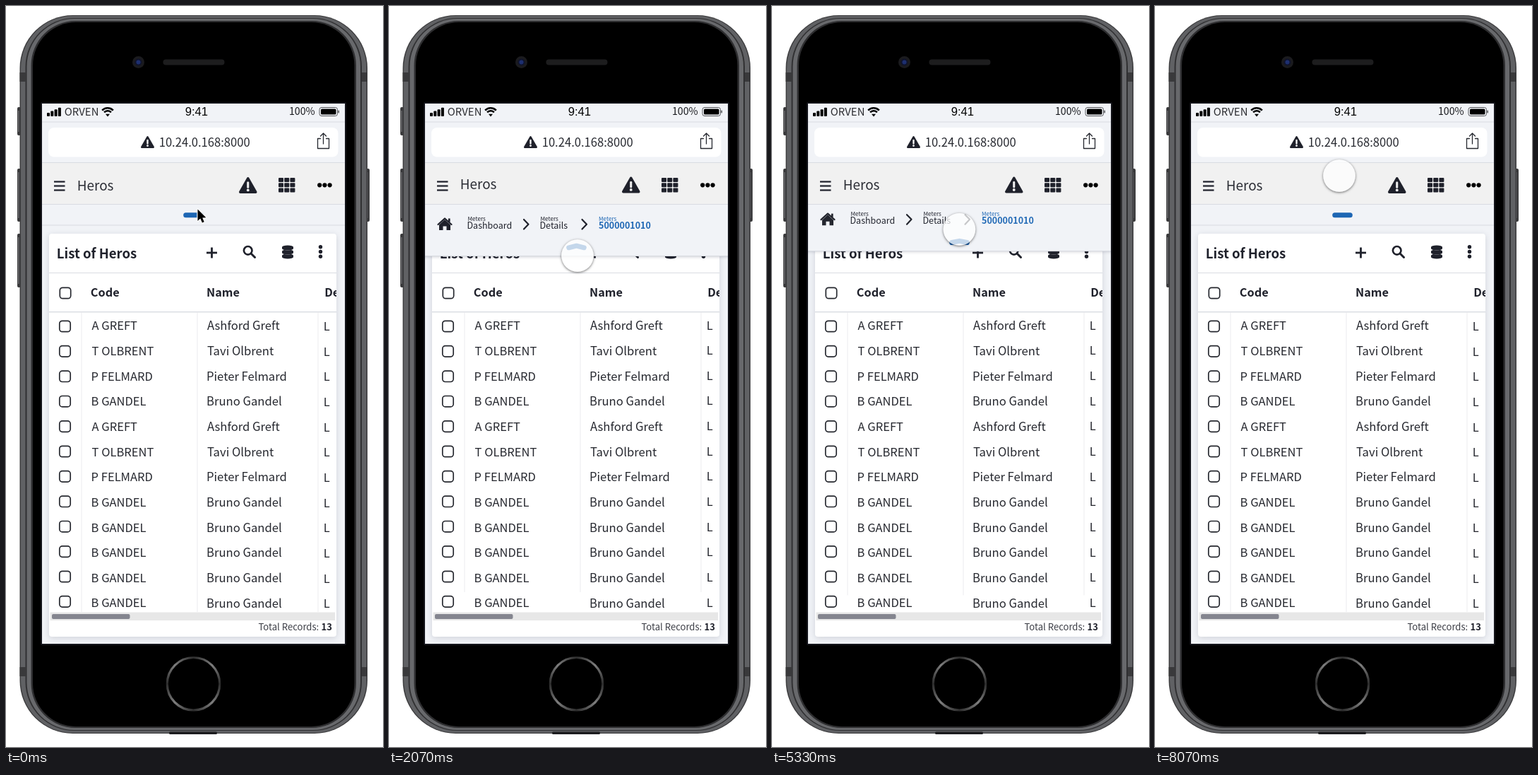
An HTML page with a canvas for the animation above (8.59 s loop, 534 by 1048 pixels).

```html
<!DOCTYPE html>
<html lang="en">
<head>
<meta charset="utf-8">
<title>Pull-down breadcrumbs</title>
<style>
html, body { margin: 0; width: 100%; height: 100%; overflow: hidden; background: #fff; }
canvas { display: block; width: 100vw; height: 100vh; }
</style>
</head>
<body>
<canvas id="stage" width="534" height="1048"></canvas>
<script>
const ctx = document.getElementById('stage').getContext('2d');
const LOOP = 8590;
const SANS = '"Noto Sans CJK SC", "Noto Sans CJK JP", "Noto Sans CJK", "Open Sans", sans-serif';
const INK = '#1f212b', SOFT = '#26282f', BLUE = '#1d66b4', PALE = '#f1f3f7', RULE = '#d9dce2';
const PEOPLE = ['Ashford Greft', 'Tavi Olbrent', 'Pieter Felmard', 'Bruno Gandel'];

// finger moves: from, to, dx, dy
const MOVES = [
  [530, 1070, -5, 5],
  [1470, 2070, 1, 58],
  [2070, 3130, -2, 52],
  [4000, 4470, 2, -61],
  [5060, 6060, -6, -104]
];

const lerp = (a, b, k) => a + (b - a) * k;
const span = (t, from, to) => Math.min(1, Math.max(0, (t - from) / (to - from)));
const ease = k => k < .5 ? 2 * k * k : 1 - 2 * (1 - k) * (1 - k);

function rect(x, y, w, h, color) {
  ctx.fillStyle = color;
  ctx.fillRect(x, y, w, h);
}
function round(x, y, w, h, r, color) {
  ctx.beginPath();
  ctx.roundRect(x, y, w, h, r);
  ctx.fillStyle = color;
  ctx.fill();
}
function stroke(color, lw) {
  ctx.strokeStyle = color;
  ctx.lineWidth = lw;
  ctx.stroke();
}
function outline(x, y, w, h, r, color, lw) {
  ctx.beginPath();
  ctx.roundRect(x, y, w, h, r);
  stroke(color, lw);
}
function disc(x, y, r, color) {
  ctx.beginPath();
  ctx.arc(x, y, r, 0, 7);
  ctx.fillStyle = color;
  ctx.fill();
}
function trace(pts) {
  ctx.beginPath();
  pts.forEach(([x, y]) => ctx.lineTo(x, y));
}
function line(pts, color, lw, cap = 'butt') {
  trace(pts);
  ctx.lineCap = cap;
  ctx.lineJoin = cap === 'round' ? 'round' : 'miter';
  stroke(color, lw);
}
function poly(pts, color) {
  trace(pts);
  ctx.closePath();
  ctx.fillStyle = color;
  ctx.fill();
}
function shadow(color, blur, dy) {
  ctx.shadowColor = color;
  ctx.shadowBlur = blur;
  ctx.shadowOffsetY = dy;
}
// x is the left edge of the ink, cy the middle of the capitals
function text(s, x, cy, size, color = INK, weight = 400, family = SANS) {
  ctx.font = `${weight} ${size}px ${family}`;
  ctx.fillStyle = color;
  ctx.fillText(s, x + ctx.measureText(s).actualBoundingBoxLeft, cy + size * .365);
}
function clipped(x, y, w, h, draw) {
  ctx.save();
  ctx.beginPath();
  ctx.rect(x, y, w, h);
  ctx.clip();
  draw();
  ctx.restore();
}

function phone() {
  for (const [x, y, h] of [[16, 143, 40], [16, 230, 75], [16, 322, 76], [510, 230, 75]]) {
    round(x, y, 5, h, 2, '#3a3a3c');
    rect(x + 1, y + 5, 1.5, h - 10, '#6b6b6e');
  }
  const shell = (dx, dy, color) =>
    round(19.5 + dx, 13 + dy, 492.5 - 2 * dx, 1016 - 2 * dy, 75 - dx * .75, color);
  shell(0, 0, '#3c3c3e');
  shell(1.5, 1, '#606164');
  for (const x of [19.5, 504]) for (const y of [94, 935]) rect(x, y, 8, 13, '#39393b');
  shell(8, 4, '#303032');
  shell(10, 5, '#68696c');
  shell(16, 8, '#2e2e30');
  shell(18.5, 10, '#000');
  round(231, 1026.5, 68, 3.5, 1.5, '#1d1d1f');

  disc(187.5, 79.5, 8.5, '#1b1b1e');
  disc(187.5, 79.5, 5, '#10142c');
  disc(187.5, 79.5, 3, '#1d2f70');
  round(222.5, 75.5, 87, 8, 4, '#1d1d1e');

  const ring = ctx.createConicGradient(0, 265.5, 958.7);
  for (let i = 0; i <= 8; i++) ring.addColorStop(i / 8, i % 2 ? '#7d7d7d' : '#2c2c2c');
  ctx.beginPath();
  ctx.arc(265.5, 958.7, 37.2, 0, 7);
  stroke(ring, 3.2);
  outline(50, 137, 431, 766, 1, '#14151b', 2);
}

function warning(x, y, w, h, hole) {
  const m = x + w / 2, r = w * .07;
  poly([[m, y + r], [x + w - r, y + h - r], [x + r, y + h - r]], INK);
  ctx.lineJoin = 'round';
  stroke(INK, r * 2);
  line([[m, y + h * .34], [m, y + h * .62]], hole, w * .12, 'round');
  disc(m, y + h * .8, w * .075, hole);
}

function browser() {
  rect(51, 138, 429, 764, PALE);
  for (let i = 0; i < 4; i++) {
    const h = 5 + i * 2.4;
    round(58 + i * 5.3, 156 - h, 4, h, 1, '#000');
  }
  text('ORVEN', 82.7, 149.5, 14.9, '#2b2c30');
  ctx.lineCap = 'butt';
  for (const r of [6.7, 10.7]) {
    ctx.beginPath();
    ctx.arc(144, 155, r, -Math.PI * .76, -Math.PI * .24);
    stroke('#000', 2.6);
  }
  poly([[144, 156.5], [141, 152.8], [147, 152.8]], '#000');
  text('9:41', 253.7, 148.5, 16.6, '#000', 400, '"Liberation Sans", sans-serif');
  text('100%', 402, 149, 14.2, '#17181c');
  outline(444, 143.5, 25.5, 12, 3, '#55565a', 1);
  round(446, 145.5, 21.5, 8, 1.5, '#000');
  round(470.5, 147.5, 1.5, 4, 1, '#55565a');
  rect(51, 163.5, 429, 1, RULE);

  round(60, 172, 410.5, 41.5, 8, '#fff');
  warning(191, 184, 19, 17, '#fff');
  text('10.24.0.168:8000', 217.7, 192.5, 16.6, SOFT);
  line([[445.5, 187.5], [441.5, 187.5], [441.5, 201.5], [457.5, 201.5], [457.5, 187.5], [453.5, 187.5]], SOFT, 1.3, 'round');
  line([[449.5, 195.5], [449.5, 180.5]], SOFT, 1.3);
  line([[445.5, 184], [449.5, 180], [453.5, 184]], SOFT, 1.3, 'round');
}

function header(p) {
  rect(51, 221.5, 429, 59, '#f1f1f1');
  rect(51, 221, 429, 1, RULE);
  rect(51, 280, 429, 1, RULE);
  for (let i = 0; i < 3; i++) {
    rect(68, 247.4 + i * 6, 15.5, 2.2, INK);
    disc(444.2 + i * 7.2, 253.3, 3.1, '#000');
  }
  text('Heros', 101.8, 254.5 - 2 * p, 18.9, '#2a2c34');
  warning(330, 242 - p * .5, 25.5, 23, '#f1f1f1');
  for (let i = 0; i < 9; i++) round(386 + i % 3 * 8.2, 243 + (i / 3 | 0) * 7.2, 7, 6, 1, INK);
}

function checkbox(x, y) {
  outline(x - 7.7, y - 7.7, 15.4, 15.4, 4, SOFT, 1.7);
}

function tools() {
  line([[284, 349], [299, 349]], INK, 2.8);
  line([[291.5, 341.5], [291.5, 356.5]], INK, 2.8);
  ctx.beginPath();
  ctx.arc(342.7, 345.8, 5.8, 0, 7);
  stroke(INK, 2.7);
  line([[347, 350], [352.5, 355.5]], INK, 3, 'round');
  // stack of three disks, each cut out of the one below
  for (let y = 353; y >= 341; y -= 6) {
    for (const [dy, color] of [[-1.6, '#fff'], [0, INK]]) {
      ctx.beginPath();
      ctx.ellipse(399, y + 2, 8, 2.6, 0, 0, Math.PI);
      ctx.ellipse(399, y + dy, 8, 2.6, 0, Math.PI, 0);
      ctx.fillStyle = color;
      if (dy === 0 || y < 353) ctx.fill();
    }
  }
  for (let i = 0; i < 3; i++) disc(445.5, 340.8 + i * 6.7, 2.7, INK);
}

function row(i, p) {
  const name = PEOPLE[i < 7 ? i % 4 : 3];
  const code = (name[0] + ' ' + name.split(' ')[1]).toUpperCase();
  const y = 452.3 + 35.65 * i;
  checkbox(83.5, 453 + 35.4 * i);
  text(code, 121.6, y, 16.55, SOFT);
  text(name, 285, y, 16.65, SOFT);
  text('L', 450.8, y + .7 - 1.5 * p, 16.5, SOFT);
}

function card(p) {
  ctx.save();
  shadow('rgba(40,45,70,.16)', 8, 2);
  round(61, 322, 407, 570, 4, '#fff');
  ctx.restore();
  text('List of Heros', 72.8, 349.8, 18.6, INK, 700);
  tools();
  rect(61, 377, 407, 1, RULE);
  rect(61, 432, 407, 1.4, RULE);
  clipped(61, 378, 407, 514, () => {
    checkbox(84, 406);
    text('Code', 119.8, 405.5, 16.3, INK, 700);
    text('Name', 285, 405, 16.3, INK, 700);
    text('De', 452.2, 405, 16.3, INK, 700);
    for (const x of [106.5, 270.5, 441.5]) rect(x, 433, 1, lerp(424, 396, p), '#ebecef');
    for (let i = 0; i < 12; i++) row(i, p);
  });
  rect(62.5, 857.5, 403.5, 11.5, '#e7e7e7');
  round(65, 860, 110.5, 7, 2, '#84858f');
  text('Total Records:', 357.5, 878.5, 13.1, '#3c3e46');
  text('13', 447.5, 878.5, 13, INK, 700);
}

function crumbs() {
  poly([[79, 302], [87, 309.5], [87, 317], [81.5, 317], [81.5, 311.5], [76.5, 311.5], [76.5, 317], [71, 317], [71, 309.5]], INK);
  line([[69.5, 309], [79, 300.5], [88.5, 309]], INK, 2.2, 'round');
  rect(84, 300.5, 2.6, 5, INK);
  for (const x of [191, 273.5]) line([[x, 302], [x + 6.5, 308.7], [x, 315.5]], INK, 2.2, 'round');
  const crumb = (label, x, color, weight) => {
    text('Meters', x, 301, 8.15, color);
    text(label, x, 310.7, 12.5, color, weight);
  };
  crumb('Dashboard', 111.5, INK);
  crumb('Details', 214.5, INK);
  crumb('5000001010', 297, BLUE, 700);
}

function panel(p) {
  const bottom = lerp(310, 353.5, p);
  clipped(51, 281, 429, 110, () => {
    ctx.save();
    shadow(`rgba(30,35,60,${.22 * p})`, 4, 1);
    rect(45, 275, 441, bottom - 275, PALE);
    ctx.restore();
    rect(51, bottom - .5, 429, 1, RULE);
    clipped(51, 281, 429, bottom - 281, () => {
      ctx.translate(0, bottom - 353.5);
      ctx.globalAlpha = 1 - (1 - p) ** 2;
      crumbs();
    });
  });
  const y = lerp(295.7, 341.8, p);
  line([[254.7, y], [265.5, y - 2.6 * p], [276.3, y]], BLUE, 7, 'round');
}

function touch(x, y) {
  const r = 23;
  ctx.save();
  ctx.beginPath();
  ctx.rect(0, 0, 534, 1048);
  ctx.arc(x, y, r - .3, 0, 7);
  ctx.clip('evenodd');
  shadow('rgba(0,0,0,.55)', 3.5, 1);
  disc(x, y, r, '#c4c5c9');
  ctx.restore();
  disc(x, y, r, 'rgba(255,255,255,.74)');
}

function arrow(x, y) {
  const pts = [[0, 0], [0, 16.5], [3.8, 13], [6.4, 19], [9.2, 17.8], [6.7, 12], [11.8, 11.8]].map(([a, b]) => [x + a, y + b]);
  line([...pts, pts[0]], '#fff', 2.2, 'round');
  poly(pts, '#000');
}

function pointer(t) {
  if (t < 70) return arrow(271.5, 287.5);
  let x = 271, y = 290;
  for (const [from, to, dx, dy] of MOVES) {
    const k = span(t, from, to);
    x += dx * k;
    y += dy * k;
  }
  touch(x, y);
}

function draw(t) {
  const p = ease(span(t, 1520, 2040)) - ease(span(t, 5185, 5705));
  ctx.clearRect(0, 0, 534, 1048);
  phone();
  browser();
  clipped(51, 281, 429, 621, () => card(p));
  header(p);
  panel(p);
  pointer(t);
}

const start = performance.now();
function tick() {
  draw((performance.now() - start) % LOOP);
  requestAnimationFrame(tick);
}
tick();
</script>
</body>
</html>
```
